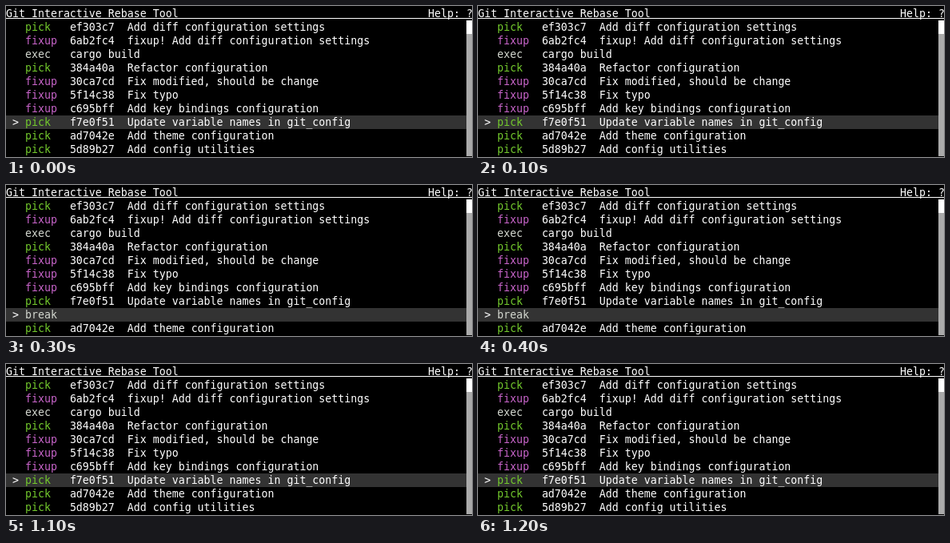
Recreate the animation shown at these times as an HTML page. Size 583 by 189 pixels, loop 1400 ms.

```html
<!DOCTYPE html>
<html lang="en">
<head>
<meta charset="utf-8">
<title>Interactive rebase</title>
<style>
  html, body { margin: 0; width: 100%; height: 100%; overflow: hidden; background: #000; }
  #stage { position: relative; width: 583px; height: 189px; overflow: hidden; background: #000; }
  pre, .bar, .track, .thumb, .rule { position: absolute; margin: 0; left: 0; }
  pre {
    font: 13.288px/17px "DejaVu Sans Mono", monospace;
    color: #fff;
    white-space: pre;
    font-variant-ligatures: none;
  }
  .title { top: 1px; }
  .help { top: 1px; left: 528px; }
  .rule { top: 15px; width: 583px; height: 1px; background: #fff; }
  .rows { top: 18px; }
  .tail { top: 154px; }
  .mark { top: 0; left: 8px; }
  .bar { width: 576px; height: 17px; top: 0; background: #333; }
  .cursor { position: absolute; left: 0; top: 137px; width: 576px; height: 17px; animation: step 1.4s step-end infinite; }
  .track { left: 576px; top: 18px; width: 7px; height: 170px; background: #aaa; }
  .thumb { left: 576px; top: 18px; width: 7px; height: 17px; background: #fff; }
  .p { color: #73c92d; }
  .f { color: #c965cb; }
  .e { color: #d3d7cf; }
  .before { animation: before 1.4s step-end infinite; }
  .after { visibility: hidden; animation: after 1.4s step-end infinite; }

  /* the break line exists from 200 ms to 1000 ms */
  @keyframes step {
    0%, 71.4286% { transform: translateY(0); }
    14.2857% { transform: translateY(17px); }
  }
  @keyframes before {
    0%, 71.4286% { visibility: visible; }
    14.2857% { visibility: hidden; }
  }
  @keyframes after {
    0%, 71.4286% { visibility: hidden; }
    14.2857% { visibility: visible; }
  }
</style>
</head>
<body>
<div id="stage">
  <div class="cursor"><div class="bar"></div><pre class="mark">&gt;</pre></div>
  <pre class="title">Git Interactive Rebase Tool</pre>
  <pre class="help">Help: ?</pre>
  <div class="rule"></div>
<pre class="rows">   <span class="p">pick</span>   ef303c7  Add diff configuration settings
   <span class="f">fixup</span>  6ab2fc4  fixup! Add diff configuration settings
   <span class="e">exec</span>   cargo build
   <span class="p">pick</span>   384a40a  Refactor configuration
   <span class="f">fixup</span>  30ca7cd  Fix modified, should be change
   <span class="f">fixup</span>  5f14c38  Fix typo
   <span class="f">fixup</span>  c695bff  Add key bindings configuration
   <span class="p">pick</span>   f7e0f51  Update variable names in git_config</pre>
<pre class="tail before">   <span class="p">pick</span>   ad7042e  Add theme configuration
   <span class="p">pick</span>   5d89b27  Add config utilities</pre>
<pre class="tail after">   <span class="e">break</span>
   <span class="p">pick</span>   ad7042e  Add theme configuration</pre>
  <div class="track"></div>
  <div class="thumb"></div>
</div>
</body>
</html>
```
